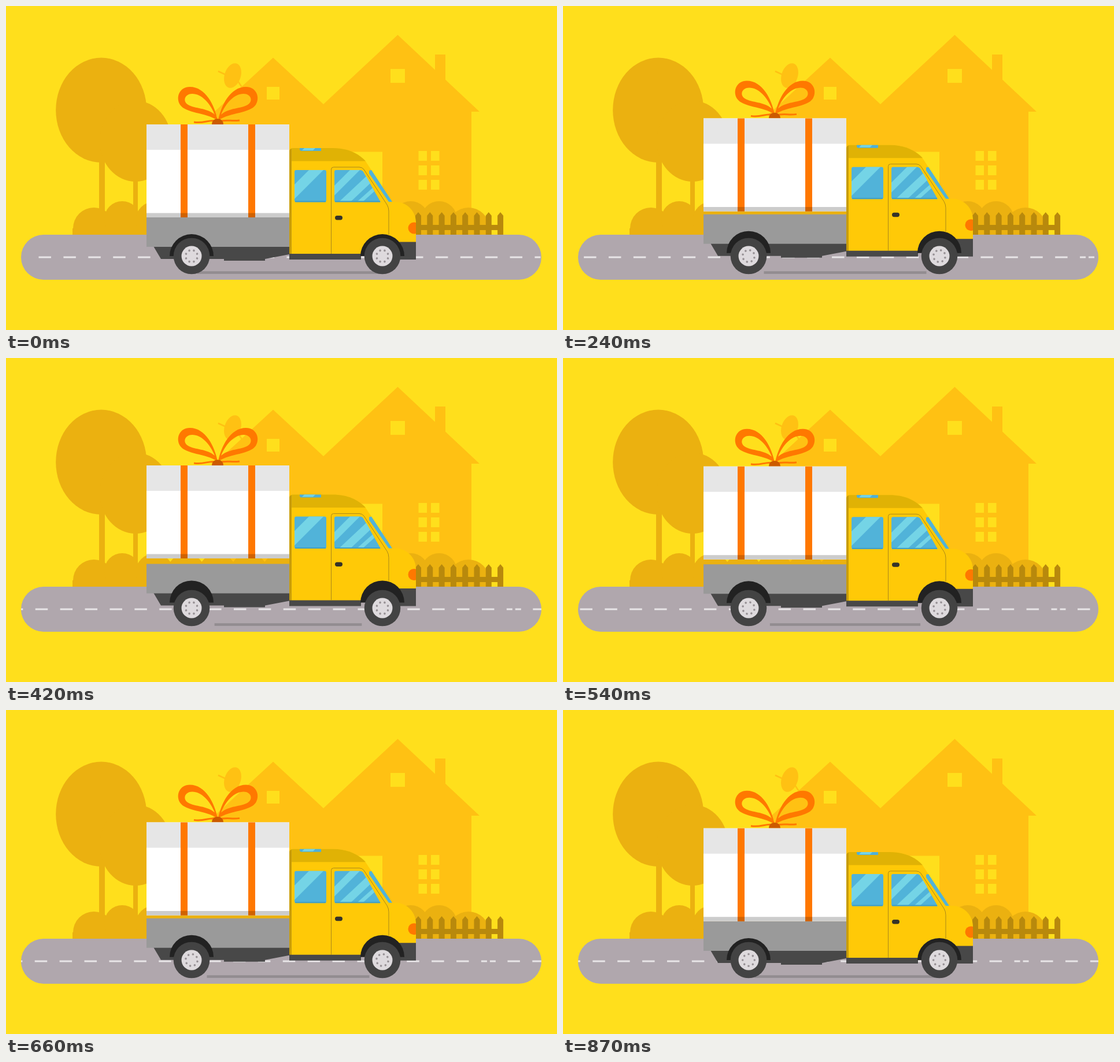
Write an HTML page that moves like this. It is 953x561 px and loops after 900 ms.

```html
<!DOCTYPE html>
<html lang="en">
<head>
<meta charset="utf-8">
<title>Gift delivery</title>
<style>
  html, body { margin: 0; width: 100%; height: 100%; overflow: hidden; background: #ffdf1c; }
  svg { display: block; width: 953px; height: 561px; }
</style>
</head>
<body>
<svg viewBox="0 0 953 561">
  <defs>
    <clipPath id="roadClip"><rect x="26" y="396" width="900" height="78" rx="39"/></clipPath>
    <clipPath id="cabClip"><path d="M490 200H709V440H490Z"/></clipPath>
    <path id="loop" fill-rule="evenodd" d="M366 198C361 172 345 140 318 140C300 140 293 158 301 171C311 186 345 184 366 198ZM361 188C353 168 338 152 322 152C309 152 305 165 315 171C327 178 347 176 361 188Z"/>
    <path id="arch" d="M-38 0A38 38 0 0 1 38 0Z" fill="#222"/>
    <g id="wheel"><circle r="31.3" fill="#434343"/><circle r="17.5" fill="#dedadd"/></g>
  </defs>

  <g fill="#ffc113">
    <path d="M353 190L462 89.5L549 170L677.5 50L819 183H805V396H365V190Z"/>
    <path d="M742 84H760V140H742Z"/>
    <ellipse cx="392" cy="120.5" rx="14" ry="22" transform="rotate(18 392 120.5)"/>
    <path d="M367 113L380 119M401 130L409 142" stroke="#ffc113" stroke-width="2.5"/>
  </g>
  <path fill="#ffdf1c" d="M451 140h22v22h-22zM665 109h25v24h-25zM585 252.500h66V396h-66z"/>
  <g id="panes" fill="#ffdf1c"></g>

  <g fill="#ebb110">
    <ellipse cx="164.700" cy="180.300" rx="78.500" ry="90.800"/>
    <ellipse cx="224" cy="234" rx="62" ry="70"/>
    <path d="M161 260h10v136h-10zM220 300h8v96h-8z"/>
    <g id="bushes"></g>
    <path d="M115 385H836V396H115Z"/>
  </g>
  <g id="fence" fill="#b8890c"><path d="M708 379H860V388H708Z"/></g>

  <rect x="26" y="396" width="900" height="78" rx="39" fill="#b0a7ad"/>
  <path id="dashes" clip-path="url(#roadClip)" stroke="#e8e5e7" stroke-width="3" fill="none"/>
  <rect id="shadow" y="459.300" height="4.500" fill="#928c90"/>

  <g id="gift">
    <g fill="#ff7800">
      <use href="#loop"/>
      <use href="#loop" transform="matrix(-1 0 0 1 733 0)"/>
    </g>
    <path d="M366 199C350 196 343 204 325 201M366 200C384 196 388 200 404 198" fill="none" stroke="#ff7800" stroke-width="3"/>
    <path d="M356 205C356 192 376 192 376 205Z" fill="#cc5b00"/>
    <path d="M243 205H490V366H243Z" fill="#fff"/>
    <path d="M243 205H490V249H243Z" fill="#e6e6e6"/>
    <path d="M243 358.500H490V366H243Z" fill="#ccc"/>
    <path d="M302 205h12v161h-12zM419 205h12v161h-12z" fill="#ff7800"/>
    <path d="M302 358.500h12v7.500h-12zM419 358.500h12v7.500h-12z" fill="#d06200"/>
  </g>

  <g id="truck">
    <path d="M255 416H490V430L448 438V441H377V438H268Z" fill="#484848"/>
    <path d="M243 366H490V417H243Z" fill="#9a9a9a"/>
    <path d="M490 430V252Q490 246 496 246H565C595 246 612 258 622 269L668 339H675C695 340 709 357 709 374V430Z" fill="#ffc907"/>
    <path d="M490 268.500V252Q490 246 496 246H565C595 246 612 258 622 268.500Z" fill="#e0b205"/>
    <path d="M490 252Q490 248 494 247V430H490Z" fill="#c99d0a"/>
    <path d="M508 246H545V251H511Q508 251 508 248Z" fill="#4fb0d8"/>
    <path d="M516 246H535L531 250H512Z" fill="#74d4e6"/>
    <path d="M490 429H614V439H490ZM680 408.500H709V439H680Z" fill="#484848"/>
    <circle cx="705.500" cy="384.500" r="10" fill="#ff7800" clip-path="url(#cabClip)"/>
    <rect x="499" y="284" width="55" height="55.500" rx="3" fill="#51b3d9"/>
    <path d="M499 309L524 284H549L499 334Z" fill="#74d4e6"/>
    <path d="M571 284H612Q616 284 618 287L648 339.500H571Q568 339.500 568 336.500V287Q568 284 571 284Z" fill="#51b3d9"/>
    <path d="M568 311L595 284H612L568 328ZM576 339L623 295L630 307L596 339ZM607 339L634 315L637 321L617 339Z" fill="#74d4e6"/>
    <path d="M500 338.500H553M569 338.500H647" stroke="#3f9dc4" stroke-width="2"/>
    <path d="M628 285L632 284L668 339H662L628 290Z" fill="#51b3d9"/>
    <path d="M562.500 429V283Q562.500 279 566.500 279H611Q616 279 619 283L659 344Q662 349 662 355V396" fill="none" stroke="#a98818"/>
    <rect x="569" y="363" width="13" height="7.500" rx="3.700" fill="#363329"/>
    <use href="#arch" x="321" y="433"/>
    <use href="#arch" x="651" y="433"/>
  </g>

  <g transform="translate(321 433)"><use href="#wheel"/><g class="bolts"></g></g>
  <g transform="translate(651 433)"><use href="#wheel"/><g class="bolts"></g></g>
</svg>
<script>
const $ = id => document.getElementById(id);
const repeat = (n, make) => Array.from({ length: n }, (_, i) => make(i)).join('');

$('panes').innerHTML = repeat(6, i =>
  `<rect x="${i % 2 ? 735 : 713.500}" y="${251 + 25 * (i >> 1)}" width="14.500" height="17"/>`);

const bush = (x, y, r) => `<circle cx="${x}" cy="${y}" r="${r}"/>`;
$('bushes').innerHTML = bush(152, 385, 36) + bush(201, 369, 31) +
  repeat(5, i => bush(257 + 54.4 * i, 371.5, 33)) +
  bush(700, 369, 31) + bush(749, 369, 31) + bush(800, 385, 36);

$('fence').innerHTML += repeat(8, i =>
  `<path d="M${708 + 20.3 * i} 396v-33l5-6l5 6v33z"/>`);

const bolts = document.querySelectorAll('.bolts');
for (const group of bolts) {
  group.innerHTML = repeat(8, i =>
    `<circle cx="10.300" r="1.800" fill="#979195" transform="rotate(${22.5 + 45 * i})"/>`);
}

const PERIOD = 42.9, DASH = 21.5, SEAM = 927;

// The road marking has a short break where its two lengths meet.
function dashPath(shift) {
  const line = (x, length) => `M${x - shift} 435h${length}`;
  return repeat(21, i => line(SEAM - 12.5 - PERIOD * (20 - i), i < 20 ? DASH : 10)) +
    line(SEAM + 2.5, 10) +
    repeat(4, i => line(SEAM + 33 + PERIOD * i, DASH));
}

function draw(now) {
  const t = Math.floor(now % 900 / 30) * 30;
  const u = 1 - Math.abs(t / 450 - 1);
  const lift = u * u * (3 - 2 * u);
  const distance = t * t / (1736 + 4.5 * t);
  const half = 157 - 30 * lift;

  $('gift').setAttribute('transform', `translate(0 ${-19.3 * lift})`);
  $('truck').setAttribute('transform', `translate(0 ${-9.7 * lift})`);
  $('shadow').setAttribute('x', 488 - half);
  $('shadow').setAttribute('width', 2 * half);
  $('dashes').setAttribute('d', dashPath(distance));
  const angle = distance / 31 * 180 / Math.PI;
  bolts.forEach(group => group.setAttribute('transform', `rotate(${angle})`));
}

const start = performance.now();
function tick() {
  draw(performance.now() - start);
  requestAnimationFrame(tick);
}
tick();
</script>
</body>
</html>
```
